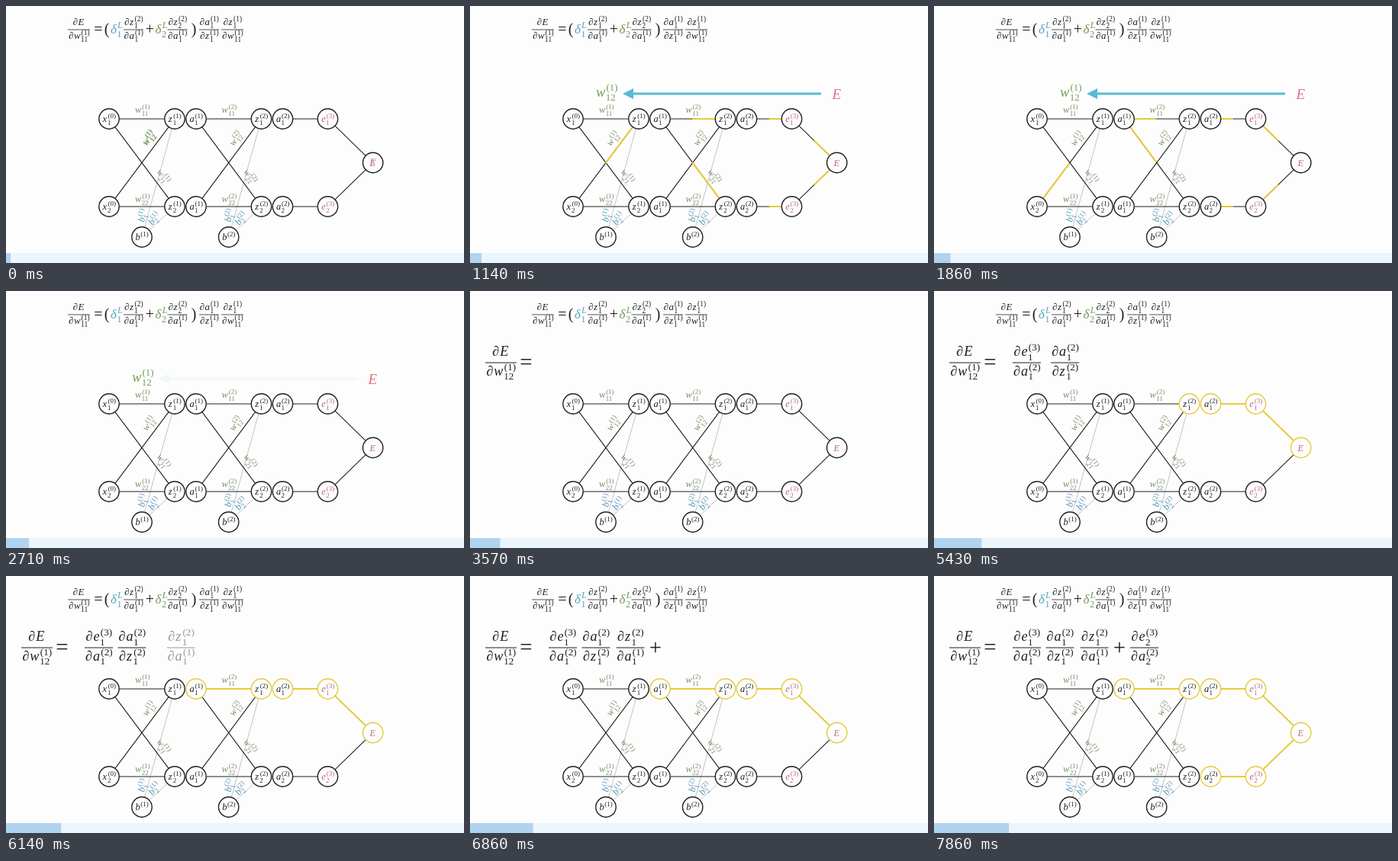
Recreate the animation shown at these times as an HTML page. Size 600x337 px, loop 8000 ms.

```html
<!DOCTYPE html>
<html lang="en">
<head>
<meta charset="utf-8">
<title>Backpropagation chain rule</title>
<style>
html, body { margin: 0; width: 100%; height: 100%; overflow: hidden; background: #fdfdfe; }
svg { display: block; width: 100vw; height: 100vh; }
text { font-family: "Liberation Serif", "Noto Serif", serif; }
</style>
</head>
<body>
<svg id="stage" viewBox="0 0 600 337"></svg>
<script>
const LOOP = 8000, FPS = 7;
const INK = '#202020', GOLD = '#e8ca3a', GREEN = '#7a8c65', BLUE = '#4c94af',
  PINK = '#b76b78', CYAN = '#58bbd6', LEAF = '#70a058', CORAL = '#e0737c';
const TOP = 148, LOW = 263, R = 13.2;
const stage = document.getElementById('stage');

const clamp = v => Math.min(1, Math.max(0, v));
const span = (t, a, b) => clamp((t - a) / (b - a));
const ease = u => u * u * (3 - 2 * u);
const mix = (a, b, u) => a + (b - a) * u;
const channels = hex => [1, 3, 5].map(i => parseInt(hex.slice(i, i + 2), 16));
function blend(from, to, u) {
  const a = channels(from), b = channels(to);
  return `rgb(${a.map((v, i) => Math.round(mix(v, b[i], u)))})`;
}

function el(parent, tag, attrs = {}) {
  const node = document.createElementNS('http://www.w3.org/2000/svg', tag);
  for (const key in attrs) node.setAttribute(key, attrs[key]);
  parent.appendChild(node);
  return node;
}
const group = (parent = stage, attrs) => el(parent, 'g', attrs);

function write(parent, x, y, size, str, fill = INK, italic = true, anchor = 'start') {
  el(parent, 'text', {
    x, y, fill, 'font-size': size, 'text-anchor': anchor,
    'font-style': italic ? 'italic' : 'normal'
  }).textContent = str;
}
const sign = (parent, x, y, size, str) => write(parent, x, y, size, str, INK, false, 'middle');

// A term is "letters sub sup"; it is centred on x with its baseline at y.
const ADVANCE = { w: .7, x: .53, z: .47, a: .53, e: .47, b: .5, E: .68, '∂': .54, 'δ': .5 };
function term(parent, x, y, size, spec, fill = INK) {
  const [letters, sub = '', sup = ''] = spec.split(' ');
  const small = size * .72;
  const base = [...letters].reduce((sum, c) => sum + ADVANCE[c], 0) * size;
  const raised = /\d/.test(sup) ? `(${sup})` : sup;
  const tail = raised ? (raised.length > 1 ? 1.17 : .6) * small : 0;
  let left = x - (base + tail) / 2;
  for (const c of letters) {
    write(parent, left, y, size, c, fill);
    left += ADVANCE[c] * size;
  }
  if (sub) write(parent, left, y + size * .29, small, sub, fill, false);
  if (raised) write(parent, left + size * .04, y - size * .39, small, raised, fill, raised.length === 1);
}

function frac(parent, x, y, size, num, den, width) {
  term(parent, x, y - size * .47, size, num);
  term(parent, x, y + size * .92, size, den);
  el(parent, 'path', { d: `M${x - width / 2} ${y}h${width}`, stroke: INK, 'stroke-width': size / 17 });
}

function label(x, y, angle, spec, fill = GREEN) {
  term(group(stage, { transform: `translate(${x} ${y}) rotate(${angle})` }), 0, 4, 12.5, spec, fill);
}

const nodes = {
  x1: [135, TOP, 'x 1 0'], x2: [135, LOW, 'x 2 0'],
  z1: [221, TOP, 'z 1 1'], z2: [221, LOW, 'z 2 1'],
  a1: [249, TOP, 'a 1 1'], a2: [249, LOW, 'a 1 1'],
  y1: [334.5, TOP, 'z 1 2'], y2: [334.5, LOW, 'z 2 2'],
  o1: [362.5, TOP, 'a 1 2'], o2: [362.5, LOW, 'a 2 2'],
  e1: [421.5, TOP, 'e 1 3', PINK], e2: [421.5, LOW, 'e 2 3', PINK],
  E: [480.7, 205.5, 'E', PINK],
  b1: [178, 303, 'b  1'], b2: [291.7, 303, 'b  2']
};

function edge(link, stroke, width) {
  const [[x1, y1], [x2, y2]] = link.split('-').map(name => nodes[name]);
  const len = Math.hypot(x2 - x1, y2 - y1), ux = (x2 - x1) / len * R, uy = (y2 - y1) / len * R;
  return el(stage, 'path', {
    d: `M${x1 + ux} ${y1 + uy}L${x2 - ux} ${y2 - uy}`,
    fill: 'none', stroke, 'stroke-width': width, pathLength: 1
  });
}

// Network; shapes are kept by name so that they can be recoloured
const shapes = {};
for (const link of 'b1-z1 b1-z2 b2-y1 b2-y2'.split(' ')) edge(link, '#a9a9a9', .7);
for (const link of 'x1-z1 x1-z2 x2-z1 x2-z2 y1-a1 a1-y2 a2-y1 a2-y2 e1-o1 e2-o2 E-e1 E-e2'.split(' '))
  shapes[link] = edge(link, INK, 1.1);

// Gold signal running back from the error
const flashes = 'E-e1 E-e2 e1-o1 e2-o2 y1-a1 y2-a1 z1-x2'.split(' ').map(link => edge(link, GOLD, 2));

for (const name in nodes) {
  const [cx, cy, spec, fill] = nodes[name];
  shapes[name] = el(stage, 'circle', { cx, cy, r: R, fill: '#fdfdfe', stroke: INK, 'stroke-width': 1.4 });
  term(stage, cx, cy + 4, 12.5, spec, fill);
}

const glows = [
  ['E e1 E-e1 e1-o1', 3570, 4140],
  ['o1 y1', 4860, 5290],
  ['a1 y1-a1', 5710, 6140],
  ['e2 o2 E-e2 e2-o2', 7000, 7500]
];

for (const [dx, layer] of [[0, 1], [113.6, 2]]) {
  label(178.5 + dx, 136, 0, `w 11 ${layer}`);
  label(178.5 + dx, 253, 0, `w 22 ${layer}`);
  label(187 + dx, 174, -54, `w 12 ${layer}`);
  label(206 + dx, 223, 54, `w 21 ${layer}`);
  label(179 + dx, 275, -75, `b 1 ${layer}`, BLUE);
  label(194 + dx, 279, -52, `b 2 ${layer}`, BLUE);
}

// Finished equation
frac(stage, 95.5, 31, 13, '∂E', '∂w 11 1', 29);
sign(stage, 121, 37, 20, '=');
sign(stage, 132.2, 37, 20, '(');
term(stage, 144.8, 36, 17, 'δ 1 L', '#55a3be');
frac(stage, 167, 31, 13, '∂z 1 2', '∂a 1 1', 26);
sign(stage, 188.5, 37, 20, '+');
term(stage, 203.5, 36, 17, 'δ 2 L', '#749a5c');
frac(stage, 224.5, 31, 13, '∂z 2 2', '∂a 1 1', 26);
sign(stage, 246, 37, 20, ')');
frac(stage, 266, 31, 13, '∂a 1 1', '∂z 1 1', 26);
frac(stage, 296.5, 31, 13, '∂z 1 1', '∂w 11 1', 29);

// Growing equation
const lead = group();
frac(lead, 40.5, 94, 18.3, '∂E', '∂w 12 1', 41);
sign(lead, 73.5, 102.5, 29, '=');
const plus = group();
sign(plus, 243, 102.5, 29, '+');
function part(x, num, den) {
  const g = group();
  frac(g, x, 94, 18.3, num, den, 37);
  return g;
}
// group, start, end, slide distance
const parts = [
  [lead, 2860, 3430, 0],
  [part(121.5, '∂e 1 3', '∂a 1 2'), 4430, 5000, 24],
  [part(165, '∂a 1 2', '∂z 1 2'), 5000, 5640, 26],
  [part(210, '∂z 1 2', '∂a 1 1'), 6000, 6500, 24],
  [plus, 6430, 6860, 0],
  [part(275.5, '∂e 2 3', '∂a 2 2'), 7290, 7860, 24]
];

// Route from the error back to the weight
const weight = group(), error = group();
term(weight, 0, 5, 18, 'w 12 1', LEAF);
term(error, 0, 6, 19, 'E', CORAL);
const arrow = group();
const shaft = el(arrow, 'path', { stroke: CYAN, 'stroke-width': 3 });
const head = el(arrow, 'path', { fill: CYAN });

el(stage, 'rect', { x: 0, y: 324, width: 600, height: 13, fill: '#ebf5fc' });
const bar = el(stage, 'rect', { x: 0, y: 324, height: 13, fill: '#b0d3ef' });

function fly(g, from, to, u, turn, scale) {
  const x = mix(from[0], to[0], u), y = mix(from[1], to[1], u);
  g.setAttribute('transform',
    `translate(${x} ${y}) rotate(${mix(turn, 0, u)}) scale(${mix(scale, 1, u)})`);
}

function draw(t) {
  const s = t / 1000;
  bar.setAttribute('width', 6 + 7.4 * s + .55 * s * s);

  const rise = ease(span(t, -75, 860)), leave = 1 - ease(span(t, 2780, 3290));
  fly(weight, [187, 174], [179, 113.5], rise, -54, 12.5 / 18);
  fly(error, [480.7, 205.5], [481, 116], rise, 0, 12.5 / 19);
  weight.setAttribute('opacity', leave);
  error.setAttribute('opacity', leave);

  const grow = ease(span(t, 430, 1100)), tip = mix(460, 200, grow);
  shaft.setAttribute('d', `M460 115H${Math.min(460, tip + 12)}`);
  head.setAttribute('d', `M${tip} 115l${14 * grow} ${-7 * grow}v${14 * grow}z`);
  arrow.setAttribute('opacity', grow ? 1 - ease(span(t, 2290, 2800)) : 0);

  const front = ease(span(t, 850, 1430)), back = ease(span(t, 1570, 2140));
  for (const f of flashes) {
    f.setAttribute('stroke-dasharray', `0 ${back} ${front - back} 2`);
    f.setAttribute('opacity', front > back ? 1 : 0);
  }

  for (const [names, a, b] of glows) {
    const u = ease(span(t, a, b));
    for (const name of names.split(' ')) {
      shapes[name].setAttribute('stroke', blend(INK, GOLD, u));
      if (name.includes('-')) shapes[name].setAttribute('stroke-width', mix(1.1, 1.9, u));
    }
  }
  for (const [g, a, b, shift] of parts) {
    const u = span(t, a, b);
    g.setAttribute('opacity', clamp(u * 1.6));
    g.setAttribute('transform', `translate(${shift * (1 - ease(u))} 0)`);
  }
}

const start = performance.now();
function tick() {
  const t = (performance.now() - start) % LOOP;
  draw(Math.floor((t + 6) * FPS / 1000) * 1000 / FPS % LOOP);
  requestAnimationFrame(tick);
}
tick();
</script>
</body>
</html>
```
